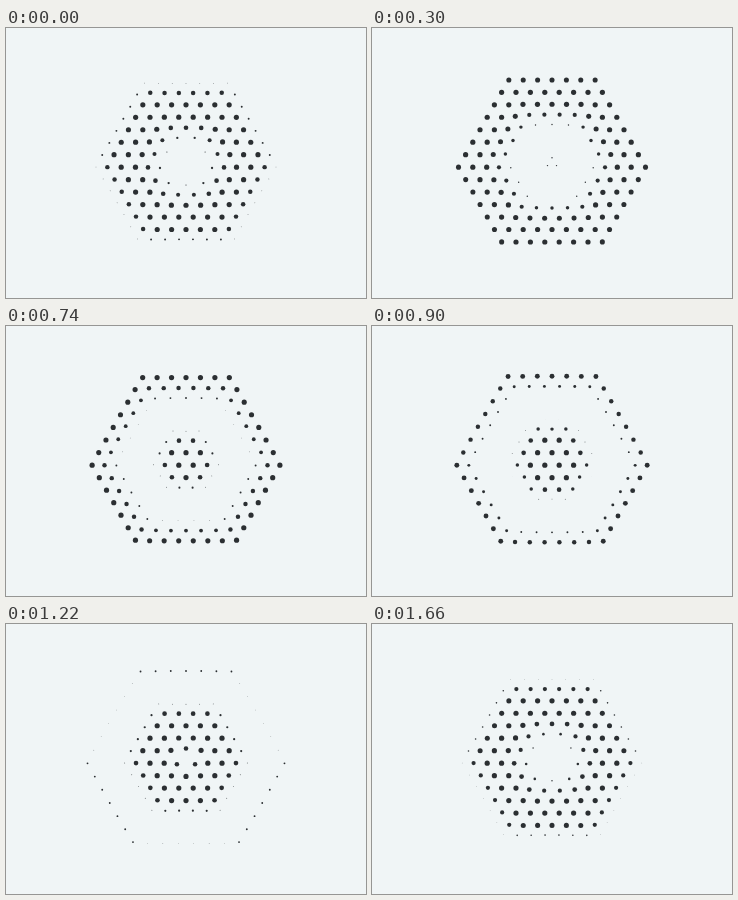
An HTML page that plays this animation: 360 px wide and 270 px high, repeating every 1.68 s.

```html
<!DOCTYPE html>
<html lang="en">
<head>
<meta charset="utf-8">
<title>Hexagonal dot wave</title>
<style>
html, body { margin: 0; width: 100%; height: 100%; overflow: hidden; background: #f0f5f6; }
svg { display: block; width: 100vw; height: 100vh; }
</style>
</head>
<body>
<svg id="stage" viewBox="0 0 360 270" fill="#2b2f32"></svg>
<script>
const LOOP = 1680;
const CENTER = { x: 180, y: 135 };
const STEP = 14.4;
const ROW = STEP * Math.sqrt(3) / 2;
const RADIUS = 2.6;
const WAVELENGTH = 88.2;
const stage = document.getElementById('stage');
const dots = [];

const clamp = v => Math.max(0, Math.min(1, v));
const smooth = v => v * v * (3 - 2 * v);
const mod = (a, n) => ((a % n) + n) % n;

// Distance measured in hexagonal rings around the centre.
function hexDistance(x, y) {
  const s = Math.sqrt(3) / 2;
  return Math.max(Math.abs(y), Math.abs(s * x + y / 2), Math.abs(s * x - y / 2));
}

// The lattice is centred on the middle of a triangle of dots.
for (let row = -7; row <= 6; row++) {
  const count = 14 - Math.abs(row);
  for (let i = 0; i < count; i++) {
    const x = (i - (count - 1) / 2) * STEP;
    const y = (row + 1 / 3) * ROW;
    const node = document.createElementNS('http://www.w3.org/2000/svg', 'circle');
    stage.appendChild(node);
    dots.push({ node, r: Math.hypot(x, y), angle: Math.atan2(y, x), ring: hexDistance(x, y) });
  }
}

// Dots grow while settling outward, rest, then shrink while drifting further out.
function pose(u) {
  const grow = smooth(clamp(u / 23.5));
  const fade = clamp((u - 45.5) / 30);
  const drift = 6.2 * Math.pow(clamp((u - 41.5) / 34), 1.25);
  return { size: RADIUS * grow * (1 - fade * fade), shift: drift - 4.2 * (1 - grow) };
}

function render(time) {
  const front = time / LOOP * WAVELENGTH + 0.5;
  for (const { node, r, angle, ring } of dots) {
    const { size, shift } = pose(mod(front - ring, WAVELENGTH));
    node.setAttribute('cx', CENTER.x + (r + shift) * Math.cos(angle));
    node.setAttribute('cy', CENTER.y + (r + shift) * Math.sin(angle));
    node.setAttribute('r', size);
  }
}

let start;
function tick(now) {
  if (start === undefined) start = now;
  render((now - start) % LOOP);
  requestAnimationFrame(tick);
}
render(0);
requestAnimationFrame(tick);
</script>
</body>
</html>
```
